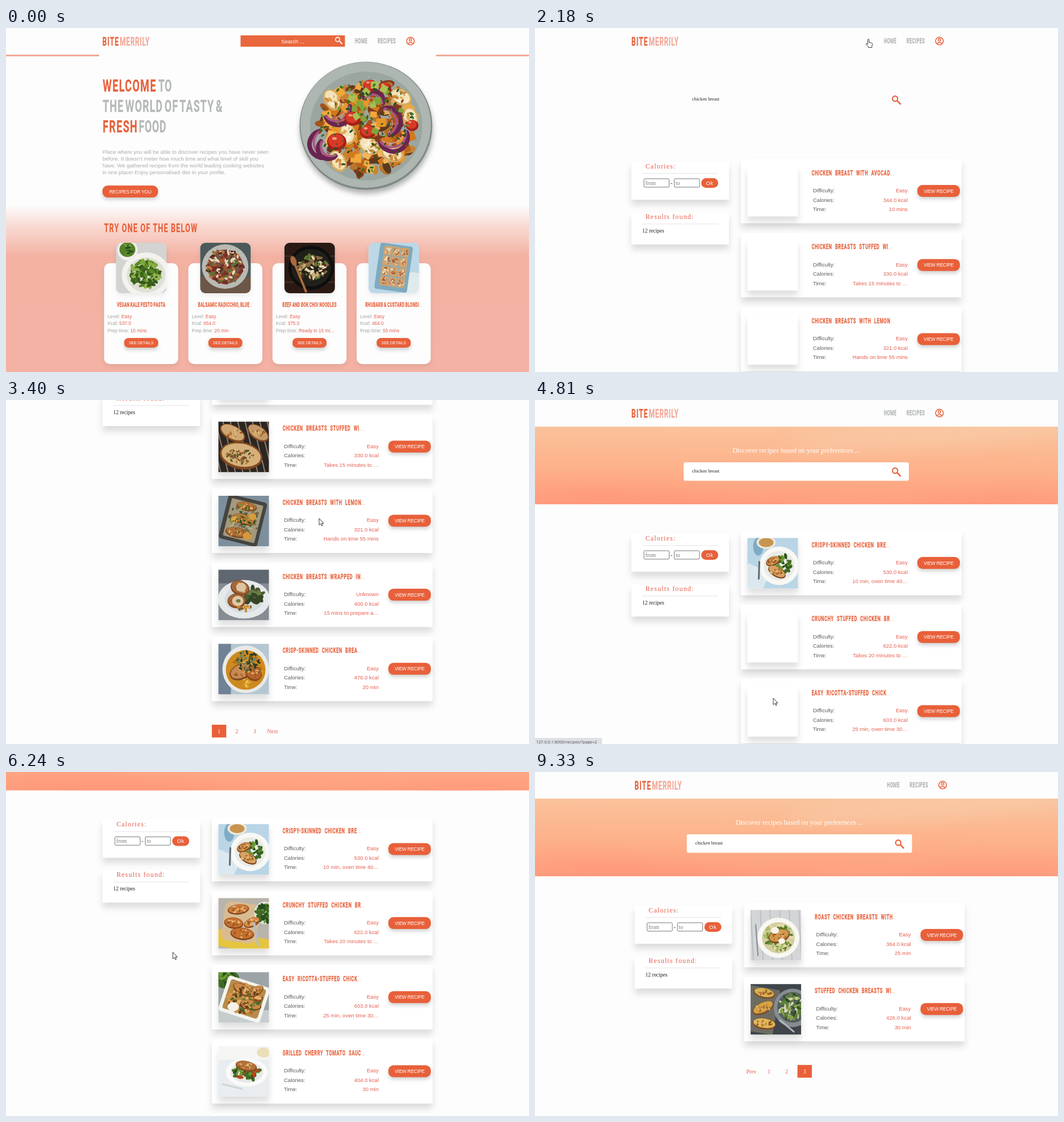
Recreate the animation shown at these times as an HTML page. Size 922 by 607 pixels, loop 9670 ms.

```html
<!DOCTYPE html>
<html lang="en">
<head>
<meta charset="utf-8">
<title>Recipe finder</title>
<style>
html, body { margin: 0; width: 100%; height: 100%; overflow: hidden; background: #fdfdfd; }
svg { display: block; width: 922px; height: 607px; }
text { white-space: pre; }
.s { font-family: "Liberation Sans", Arial, sans-serif; }
.f { font-family: "Liberation Serif", "Times New Roman", serif; }
.u { font-family: "Open Sans", sans-serif; }
.d { font-family: Roboto, sans-serif; font-weight: 700; stroke-width: .25; }
.card { filter: drop-shadow(0 9px 6px rgba(0,0,0,.13)); }
.tile { filter: drop-shadow(0 4px 4px rgba(0,0,0,.07)); }
.pill { filter: drop-shadow(0 4px 3px rgba(0,0,0,.18)); }
.plate { filter: drop-shadow(1px 7px 5px rgba(0,0,0,.3)); }
.soft { filter: blur(14px); }
.food { filter: blur(.6px); }
</style>
</head>
<body>
<svg id="stage" viewBox="0 0 922 607"></svg>
<script>
const LOOP = 9670, TICK = 70;
const ORANGE = '#e8603a', SALMON = '#f3a899', GREY = '#b4b8b7', RED = '#e45f50', PAPER = '#fdfdfd';

// Drawing helpers
const E = (x, y, rx, ry, fill, a = 0) =>
  `<ellipse cx="${x}" cy="${y}" rx="${rx}" ry="${ry}" fill="${fill}" transform="rotate(${a} ${x} ${y})"/>`;
const R = (x, y, w, h, fill, r = 0, more = '') =>
  `<rect x="${x}" y="${y}" width="${w}" height="${h}" rx="${r}" fill="${fill}" ${more}/>`;
const tilt = (a, x, y) => `transform="rotate(${a} ${x} ${y})"`;
const P = (d, stroke, w = 1, fill = 'none') =>
  `<path d="${d}" stroke="${stroke}" stroke-width="${w}" fill="${fill}" stroke-linecap="round"/>`;
const T = (x, y, s, size, fill, cls = 's', anchor = 'start', ls = 0) =>
  `<text class="${cls}" x="${x}" y="${y}" font-size="${size}" fill="${fill}" text-anchor="${anchor}" letter-spacing="${ls}">${s}</text>`;
const CONDENSE = .6;
const D = (x, y, s, size, fill, ls = 0, anchor = 'start', ws = 0) =>
  `<text class="d" transform="translate(${x} ${y}) scale(${CONDENSE} 1)" font-size="${size}" fill="${fill}" stroke="${fill}"
    text-anchor="${anchor}" letter-spacing="${ls / CONDENSE}" word-spacing="${ws / CONDENSE}">${
    s.replace('…', '<tspan font-weight="300" stroke="none">...</tspan>')}</text>`;
const G = (s, attrs = '') => `<g ${attrs}>${s}</g>`;
const pill = (x, y, w, h, s, size, ls) =>
  R(x, y, w, h, ORANGE, h * .43, 'class="pill"') + T(x + w / 2, y + h / 2 + size * .36, s, size, '#fff', 's', 'middle', ls);
const lens = (x, y, k, c) =>
  G(`<circle cx="5.5" cy="5.5" r="4.4" fill="none" stroke="${c}" stroke-width="2"/>` + P('M9 9L14.4 14.4', c, 2.4),
    `transform="translate(${x} ${y}) scale(${k})"`);

// Scatters small blobs or blocks inside an ellipse
function bits(seed, n, x, y, rx, ry, size, colors, block = false) {
  const rnd = () => (seed = seed * 16807 % 2147483647) / 2147483647;
  let out = '';
  seed = seed * 7919 + 13;
  rnd();
  for (let i = 0; i < n; i++) {
    const a = rnd() * 6.283, r = Math.sqrt(rnd()), s = size * (.6 + .7 * rnd());
    const px = +(x + rx * r * Math.cos(a)).toFixed(1), py = +(y + ry * r * Math.sin(a)).toFixed(1);
    const turn = Math.round(rnd() * 180), c = colors[Math.floor(rnd() * colors.length)];
    out += block ? R(px - s, py - s, s * 2, s * 1.8, c, 1, tilt(turn, px, py)) : E(px, py, s, s * .5, c, turn);
  }
  return out;
}

const GREENS = ['#3f6b25', '#6d9a35', '#274d1e'];
const GOLDS = ['#b8692c', '#d9974a', '#8f4a1e', '#e3b268'];
const bg = c => R(-4, -4, 97, 97, c);
const dish = (x, y, r, rim, well) => E(x, y, r, r * .96, rim) + E(x, y, r * .78, r * .74, well);
const fillet = (x, y, rx, ry, a, c = '#c98a47') => E(x, y, rx, ry, '#7f4821', a) + E(x, y - 1, rx * .92, ry * .84, c, a) +
  bits(x + y, 16, x, y, rx * .7, ry * .65, 2.6, ['#96541f', '#e4b877', '#b2702f']);

// 89 x 89 food pictures
const pics = {
  pesto: bg('#d3d4d1') + E(53, 57, 43, 40, '#f3f2ee') + E(53, 57, 34, 31, '#dfe0d6') +
    bits(3, 150, 51, 54, 26, 23, 5, ['#5d8a26', '#7fa83c', '#3f6a1b', '#90b34e', '#345a1a']) +
    E(20, 13, 18, 18, '#efefea') + E(20, 12, 14, 13, '#557f2a') + bits(4, 18, 20, 12, 10, 9, 3, GREENS),
  balsamic: bg('#4c5a59') + R(0, 60, 89, 33, '#6b5647') + dish(44, 42, 41, '#b9bab3', '#77513f') +
    bits(5, 150, 44, 42, 32, 30, 4, ['#7b2e25', '#a6552c', '#54281f', '#e5d9c5', '#bf7740', '#607035']),
  noodles: bg('#2b1a14') + R(0, 22, 89, 3, '#402a20') + R(0, 68, 89, 3, '#402a20') + E(47, 44, 40, 39, '#0e0e0f') +
    E(47, 44, 35, 33, '#211f1a') + bits(6, 100, 50, 43, 26, 21, 4, ['#c8ab77', '#8c6a3e', '#5e7a35', '#e5d8b2', '#4a2c1c']) +
    P('M17 34L38 86', '#a86b3c', 4) + E(16, 32, 5, 9, '#a86b3c', -20),
  blondie: bg('#bcd8e6') + E(78, 76, 24, 24, '#dfeaec') + G(R(15, 3, 58, 82, '#7fa9be', 4) +
    Array.from({ length: 12 }, (_, i) => {
      const x = 23 + i % 3 * 15, y = 7 + Math.floor(i / 3) * 18;
      return R(x, y, 14, 16.5, '#cfa46f', 1) + bits(i + 8, 9, x + 7, y + 8, 5, 6, 2.3, ['#9c5a36', '#f0dfbb', '#c4714e']);
    }).join(''), tilt(8, 45, 45)),
  avocado: bg('#dfe2df') + dish(45, 46, 40, '#f6f5f0', '#e9e6da') + bits(21, 50, 45, 44, 27, 24, 5, ['#86a845', '#b9c968', '#d2603a', '#4d7530']) +
    fillet(44, 48, 22, 11, -20),
  grill: bg('#2d2520') + Array.from({ length: 9 }, (_, i) => P(`M${i * 13 - 18} 0L${i * 13 + 4} 89`, '#8b8177', 2)).join('') +
    fillet(25, 20, 24, 13, 28, '#cfa673') + fillet(70, 20, 21, 12, 35, '#c39a69') + fillet(40, 60, 38, 24, 10, '#d6b07a') +
    bits(23, 44, 38, 60, 24, 13, 3, ['#6a3d1c', '#9a6633', '#4f5a2a']),
  lemon: bg('#7d8f9c') + R(8, 4, 70, 80, '#45443f', 5, tilt(14, 44, 44)) + R(15, 10, 57, 68, '#a3987d', 2, tilt(14, 44, 44)) +
    bits(24, 40, 44, 44, 27, 32, 5, ['#8a7d62', '#b5a988', '#71654c']) +
    fillet(50, 19, 18, 8, 12, '#ae7338') + fillet(45, 42, 21, 9, 18, '#b87d3d') + fillet(32, 65, 20, 9, 12, '#ae7338') +
    E(60, 37, 7, 6, '#d99c3b') + E(28, 42, 6, 6, '#dca548') + E(51, 71, 8, 7, '#d5983c') + bits(25, 34, 43, 43, 26, 30, 2.5, GREENS),
  wrapped: bg('#868c93') + R(-4, -4, 97, 28, '#5f6770') + E(45, 52, 46, 34, '#e6e9ea') + E(45, 52, 34, 24, '#d6dbdd') +
    bits(27, 30, 63, 46, 16, 13, 8, ['#4a5a33', '#6c7a45', '#354627']) + fillet(38, 32, 17, 13, 20, '#a7683b') + E(40, 31, 9, 8, '#dcc4a2') +
    fillet(32, 55, 16, 13, 0, '#a7683b') + E(34, 55, 10, 9, '#dfc9aa') + E(35, 55, 4, 3, '#6d7a3c') +
    bits(28, 16, 46, 68, 14, 5, 3, ['#c98a2b', '#7d5a2c']),
  broth: bg('#b5c6d3') + R(-4, -4, 26, 97, '#6f8296') + E(48, 45, 41, 42, '#e9e9e5') + E(48, 46, 35, 35, '#cd8a20') +
    bits(29, 34, 48, 48, 30, 28, 4, ['#e3a530', '#ba7015', '#f0c35b']) + fillet(40, 49, 21, 14, -25, '#c98a52') + fillet(62, 52, 15, 13, 30, '#b9632a') +
    bits(30, 60, 52, 30, 20, 18, 3, ['#47512d', '#2e3923', '#7c8250']),
  blue: bg('#b9d5e6') + R(-8, 50, 42, 44, '#dce8ef', 0, tilt(24, 10, 70)) + E(19, 15, 9, 16, '#7eacc5') + E(33, 8, 17, 11, '#efe9da') + E(33, 8, 13, 8, '#c89550') +
    E(56, 49, 35, 34, '#f8f8f4') + E(56, 49, 27, 26, '#e8ebe7') + bits(31, 50, 65, 45, 14, 15, 4, GREENS) +
    fillet(45, 41, 13, 8, -25) + fillet(52, 60, 17, 9, 30, '#d8a362') + P('M21 42L20 72', '#5f6870', 3),
  board: bg('#b9b4ab') + R(-4, 64, 97, 29, '#e5c53f', 0, tilt(12, 44, 76)) + R(8, 8, 62, 70, '#d9bb92', 12, tilt(8, 40, 44)) +
    E(82, 26, 19, 20, '#dfe2dd') + bits(33, 44, 82, 26, 14, 15, 6, GREENS) + fillet(35, 20, 19, 9, -6, '#cd7835') +
    fillet(27, 44, 17, 10, 8, '#c96f2d') + fillet(59, 43, 15, 8, -24, '#d88943') + fillet(42, 63, 21, 11, 6, '#c96f2d') + P('M63 44L70 83', '#b8bdc0', 4),
  tray: bg('#9ca4a7') + R(-4, 67, 97, 26, '#c6cdce') + E(14, 12, 23, 17, '#436e29') + bits(35, 36, 14, 12, 20, 14, 5, GREENS) +
    R(7, 15, 77, 65, '#f4f4ef', 5, tilt(18, 45, 47)) + R(13, 20, 65, 54, '#b78b48', 4, tilt(18, 45, 47)) +
    bits(36, 110, 46, 47, 30, 25, 5, [...GOLDS, '#56702c', '#63401e']) + fillet(43, 31, 19, 9, 30) + fillet(65, 34, 16, 8, -30) + fillet(57, 58, 19, 9, 12) +
    bits(37, 40, 48, 48, 28, 22, 3, ['#4c682a', '#5b3519', '#d6a654']) + E(26, 61, 10, 8, '#f3f1e8'),
  tomato: bg('#e9edef') + R(-4, -4, 97, 28, '#f5f5f4') + E(80, 11, 12, 9, '#eadfb9') + E(50, 46, 37, 25, '#fafafa') + E(50, 46, 29, 18, '#e7e8e5') +
    bits(38, 60, 49, 46, 24, 12, 5, [...GREENS, '#b9451f']) + fillet(49, 35, 19, 9, 12, '#b5713a') + P('M8 67L41 75', '#cfd5d7', 3),
  poached: bg('#8c9eb5') + R(-4, -4, 34, 97, '#6c7f98', 0, tilt(8, 0, 0)) + dish(47, 46, 40, '#ece5da', '#dcd2c3') +
    bits(40, 60, 47, 47, 26, 23, 5, ['#d87a2c', '#e3a04a', '#557232', '#bf5a24']) + E(49, 45, 12, 21, '#f5efe1', 8) +
    E(48, 38, 8, 11, '#fdf9ef', 8) + bits(41, 7, 48, 42, 6, 14, 1.5, GREENS) + P('M7 19L4 58', '#3d4653', 3),
  roast: bg('#d3d5d6') + Array.from({ length: 6 }, (_, i) => P(`M${i * 17} 0L${i * 17 + 5} 89`, '#b4babe', 1.5)).join('') +
    dish(49, 49, 37, '#f8f7f2', '#d4cda0') + bits(43, 90, 49, 49, 26, 24, 4, ['#7d9b3c', '#a9bc68', '#e6d9a7', '#557b2b']) +
    fillet(50, 46, 19, 12, -18, '#d09a4d') + E(43, 36, 7, 6, '#faf5e9') + E(55, 55, 6, 5, '#faf5e9') + P('M9 26L13 80', '#81898d', 2),
  slate: bg('#3f454b') + R(-8, 6, 54, 80, '#6c6c63', 3, tilt(10, 20, 45)) + fillet(24, 16, 19, 9, 12, '#d5b150') + fillet(22, 42, 20, 10, -26, '#d2a346') +
    fillet(24, 70, 21, 10, 8, '#dcb75b') + E(74, 42, 33, 34, '#868d92') + E(74, 41, 27, 27, '#555d61') +
    bits(45, 90, 72, 39, 21, 22, 4, ['#5d8138', '#86a34d', '#324e22', '#d8d5b2']) + P('M52 64L76 84', '#b4b8b8', 3),
};
const photo = (name, x, y, clip, attrs = '') =>
  G(G(G(pics[name], 'class="food"'), `clip-path="url(#${clip})"`), `transform="translate(${x} ${y})" ${attrs}`);

const header = () =>
  D(170, 31, 'BITE', 20, ORANGE, 1.1) + D(200.5, 31, 'MERRILY', 20, SALMON, .7) +
  D(615, 27, 'HOME', 12.2, '#aeb4b2', .4) + D(655, 27, 'RECIPES', 12.2, '#aeb4b2', .5) +
  `<circle cx="713" cy="23" r="6.8" fill="none" stroke="${ORANGE}" stroke-width="1.6"/>
   <circle cx="713" cy="20.9" r="2.2" fill="none" stroke="${ORANGE}" stroke-width="1.4"/>` + P('M708.5 27.5Q713 23.6 717.5 27.5', ORANGE, 1.4);

function salad() {
  const onion = (x, y, r, a) => G(P(`M${-r} 0A${r} ${r} 0 0 1 ${r} 0`, '#6a2450', 8) +
    P(`M${-r + 1} 1A${r} ${r} 0 0 1 ${r - 1} 1`, '#a8577f', 4) + P(`M${-r + 4} 2A${r} ${r} 0 0 1 ${r - 4} 2`, '#d9a5bd', 1.2),
    `transform="translate(${x} ${y}) rotate(${a})"`);
  const cheese = (x, y, a) => E(x, y, 20, 14, '#d5ac62', a) + E(x, y - 1, 17, 11, '#f3e2b8', a) +
    bits(x, 10, x, y, 14, 11, 4, ['#c6873b', '#dca85a', '#f9f0d8']);
  const tomato = (x, y, r) => E(x, y, r, r * .9, '#a91d18') + E(x - 1, y - 2, r * .82, r * .7, '#d63a27') + E(x - 4, y - 6, r * .25, r * .15, '#f39a80');
  const food = bits(52, 150, 638, 174, 84, 84, 11, ['#a6521c', '#7d3a1c', '#b8752b', '#c98334', '#5c3a1c']) +
    bits(53, 70, 638, 174, 82, 80, 7.5, ['#e8962a', '#f0a83c', '#d27a1e', '#f3b658', '#b9651b'], true) +
    cheese(575, 127, 60) + cheese(696, 122, 25) + cheese(713, 160, 80) + cheese(585, 235, 60) + cheese(681, 222, 20) + cheese(602, 186, 80) + cheese(640, 208, 30) +
    onion(585, 148, 23, 155) + onion(559, 205, 24, 250) + onion(568, 213, 18, 225) + onion(672, 165, 24, 80) + onion(683, 193, 25, 160) + onion(648, 128, 17, 15) +
    tomato(583, 201, 17) + tomato(611, 160, 14) + tomato(638, 183, 14) + tomato(642, 102, 12) + tomato(668, 106, 11) + tomato(716, 172, 11) +
    bits(54, 14, 640, 174, 80, 78, 5.5, ['#7fa63a', '#a8c054'], true) +
    bits(55, 150, 637, 172, 84, 82, 3, [...GREENS, '#355f20', '#8a3a1c']);
  return G(E(634.5, 172.5, 117, 113, '#7f8987') + E(634, 171, 115, 111, '#adb6b1') + E(635, 173, 99, 96, '#9ba6a1'), 'class="plate"') +
    bits(51, 120, 634, 172, 110, 106, 1, ['#8d9793', '#c1c8c4']) + G(food, 'class="food"');
}

function home() {
  const dishes = [
    ['pesto', 'VEGAN KALE PESTO PASTA', '537.0', '10 mins'],
    ['balsamic', 'BALSAMIC RADICCHIO, BLUE…', '654.0', '20 min'],
    ['noodles', 'BEEF AND BOK CHOI NOODLES', '375.0', 'Ready in 15 mi…'],
    ['blondie', 'RHUBARB &amp; CUSTARD BLONDI…', '464.0', '55 mins'],
  ];
  const intro = ['Place where you will be able to discover recipes you have never seen',
    'before. It doesn\'t meter how much time and what level of skill you',
    'have. We gathered recipes from the world leading cooking websites',
    'in one place! Enjoy personalised diet in your profile.'];
  const pair = (x, y, k, v) => T(x, y, `${k}: <tspan fill="${RED}">${v}</tspan>`, 8.3, '#a3a6a6');
  return R(0, 0, 922, 607, PAPER) + R(0, 312, 922, 295, 'url(#dusk)') +
    R(0, 47, 164, 3, SALMON) + R(758, 47, 164, 3, SALMON) + header() +
    R(413.5, 13, 184, 20, '#e9673c') + T(505.5, 26.5, 'Search ...', 9.5, '#fff', 's', 'middle').replace('<text', '<text id="query"') +
    lens(580, 15.5, .85, '#fff') +
    D(170.5, 112, 'WELCOME', 30, ORANGE, 1.4) + D(268.5, 112, 'TO', 30, GREY, .4) +
    D(170.5, 148, 'THE WORLD OF TASTY &amp;', 30, GREY, 1.1, 'start', -3) +
    D(170.5, 184, 'FRESH', 30, ORANGE, 1.4) + D(234, 184, 'FOOD', 30, GREY, .6) +
    intro.map((s, i) => T(170, 222.3 + i * 12, s, 9.52, '#a9adac')).join('') +
    pill(170, 278, 98, 21, 'RECIPES FOR YOU', 8.4, -.2) + salad() +
    D(173, 360, 'TRY ONE OF THE BELOW', 21, ORANGE, 1.22) +
    dishes.map(([pic, name, kcal, time], i) => {
      const x = 173 + i * 148.4;
      return R(x, 415, 130.5, 178, PAPER, 10, 'class="tile"') + R(x + 21, 379, 89, 89, '#fff', 9, 'class="tile"') +
        photo(pic, x + 21, 379, 'round') + D(x + 65.3, 492.3, name, 10.6, ORANGE, .3, 'middle', -.4) +
        pair(x + 6, 512, 'Level', 'Easy') + pair(x + 6, 524, 'Kcal', kcal) + pair(x + 6, 536.5, 'Prep time', time) +
        pill(x + 35.3, 547, 60, 17, 'SEE DETAILS', 7.1, -.17);
    }).join('');
}

const results = [
  [['avocado', 'CHICKEN BREAST WITH AVOCAD…', '344.0', '10 mins'],
    ['grill', 'CHICKEN BREASTS STUFFED WI…', '330.0', 'Takes 15 minutes to …'],
    ['lemon', 'CHICKEN BREASTS WITH LEMON…', '321.0', 'Hands on time 55 mins'],
    ['wrapped', 'CHICKEN BREASTS WRAPPED IN…', '400.0', '15 mins to prepare a…', 'Unknown'],
    ['broth', 'CRISP-SKINNED CHICKEN BREA…', '476.0', '20 min']],
  [['blue', 'CRISPY-SKINNED CHICKEN BRE…', '530.0', '10 min, oven time 40…'],
    ['board', 'CRUNCHY STUFFED CHICKEN BR…', '622.0', 'Takes 20 minutes to …'],
    ['tray', 'EASY RICOTTA-STUFFED CHICK…', '603.0', '25 min, oven time 30…'],
    ['tomato', 'GRILLED CHERRY TOMATO SAUC…', '404.0', '30 min'],
    ['poached', 'POACHED CHICKEN BREAST', '133.0', '15 mins']],
  [['roast', 'ROAST CHICKEN BREASTS WITH…', '364.0', '25 min'],
    ['slate', 'STUFFED CHICKEN BREASTS WI…', '426.0', '30 min']],
];

function recipe([pic, name, kcal, time, level = 'Easy'], i, page) {
  const row = (y, k, v) => T(490, y, k, 9.5, '#5b5b5b') + T(657, y, v, 9.5, RED, 's', 'end');
  return G(R(363, 231, 389, 113.5, '#fff', 0, 'class="card"') + R(374.5, 243.5, 89, 89, '#fff', 0, 'class="card"') +
    photo(pic, 374.5, 243.5, 'square', `class="pic${page}${i ? 'b' : 'a'}"`) + D(487.7, 259.5, name, 12.5, ORANGE, .65, 'start', 2.8) +
    row(290, 'Difficulty:', level) + row(306.5, 'Calories:', `${kcal} kcal`) + row(323, 'Time:', time) +
    pill(674, 277, 75, 21, 'VIEW RECIPE', 8.4, -.2), `transform="translate(0 ${i * 130.7})"`);
}

function listing(list, index) {
  const page = index + 1, y = 231 + list.length * 130.7 + 24.5;
  const links = [...(page > 1 ? ['Prev'] : []), 1, 2, 3, ...(page < 3 ? ['Next'] : [])];
  const field = (x, s) => R(x, 266, 44.5, 14.8, '#fff', 1.5, 'stroke="#777"') + T(x + 2.5, 276.6, s, 9.5, '#777', 'f');
  const side = (top, h, s, base) => R(170, top, 172, h, '#fff', 0, 'class="card"') +
    T(194.7, base, s, 12, RED, 'f', 'start', 1.15) + R(189, base + 8.3, 134, 1, '#e4e4e4');
  const banner = R(0, 47, 922, 137, 'url(#peach)') + G(G(E(700, 62, 260, 22, '#f8cba8', -4) + E(180, 176, 170, 14, '#ff9678', 4) +
    E(560, 180, 130, 9, '#ffa884', -3) + E(800, 182, 120, 12, '#ff987c', -4), 'class="soft"'), 'clip-path="url(#band)" opacity=".6"');
  const inner = header() + G(R(262, 110, 397, 32.5, '#fff', 3) + T(460.5, 92.5, 'Discover recipes based on your preferences ...', 12.2, '#fff', 'f', 'middle'), `class="hero${page}"`) +
    T(277, 128, 'chicken breast', 8.4, '#222', 'f') + lens(629, 119, 1.05, ORANGE) +
    side(236, 67, 'Calories:', 248) + field(192, 'from') + T(239, 276.5, '-', 9.5, '#222', 'f') + field(245.5, 'to') +
    R(293, 265, 30, 17, ORANGE, 8.5) + T(308, 276.8, 'Ok', 9.5, '#fff', 's', 'middle', .4) +
    side(325, 57, 'Results found:', 337) + T(189, 361, '12 recipes', 9.5, '#222', 'f') +
    list.map((r, i) => recipe(r, i, page)).join('') +
    links.map((s, i) => {
      const x = 375.6 + i * 31.4, on = s === page;
      return (on ? R(x - 12.7, y, 25.4, 22.5, ORANGE) : '') + T(x, y + 14.6, s, 9.6, on ? '#fff' : RED, 'f', 'middle');
    }).join('');
  return G(G(banner, `class="hero${page}"`) + G(inner, page === 3 ? 'transform="translate(5.6 0)"' : ''), `id="page${page}"`);
}

const status = page => G(R(-1, 597, 118.5, 11, '#dee1e6', 2, 'stroke="#c4c7cb" stroke-width=".6"') +
  T(2, 606, `127.0.0.1:8000/recipes/?page=${page}`, 7.3, '#4a4d51', 'u'), `id="status${page}"`);

const stage = document.getElementById('stage');
stage.innerHTML = `<defs>
  <linearGradient id="dusk" x2="0" y2="1"><stop stop-color="${PAPER}"/><stop offset=".12" stop-color="#f9dcd5"/>
    <stop offset=".31" stop-color="#f3b1a2"/><stop offset="1" stop-color="#f3b2a4"/></linearGradient>
  <linearGradient id="peach" x1=".53" y1="0" x2=".47" y2="1"><stop stop-color="#fac39c"/><stop offset=".5" stop-color="#fdb38b"/>
    <stop offset="1" stop-color="#ff9d7e"/></linearGradient>
  <clipPath id="round"><rect width="89" height="89" rx="9"/></clipPath>
  <clipPath id="square"><rect width="89" height="89"/></clipPath>
  <clipPath id="band"><rect y="47" width="922" height="137"/></clipPath></defs>` +
  R(0, 0, 922, 607, PAPER) + G(home(), 'id="home"') + results.map(listing).join('') + status(2) + status(3) +
  G(`<path d="M0 0V11.5L2.7 9.2L4.5 13L6.3 12.2L4.6 8.5H8Z" fill="#fff" stroke="#222" stroke-width=".9"/>`, 'id="arrow"') +
  G(P('M3.6 9.5V1.8a1.2 1.2 0 0 1 2.4 0V6.3l4.3.9q1.6.4 1.4 2.2l-.8 4v2H4.7v-1.3L.7 9.9q-.5-1.5.9-1.6z', '#222', .9, '#fff'), 'id="hand"');

// [selector, shown from, hidden from]
const shows = [
  ['#home', 0, 2180], ['#page1', 2180, 4470], ['#page2', 4470, 7800], ['#page3', 7800, LOOP],
  ['.hero1', 2260, LOOP], ['.pic1a', 2260, LOOP], ['.pic1b', 2260, LOOP],
  ['.hero2', 4810, LOOP], ['.pic2a', 4810, LOOP], ['.pic2b', 4880, LOOP],
  ['.hero3', 7950, LOOP], ['.pic3a', 8160, LOOP], ['.pic3b', 8160, LOOP],
  ['#status2', 4130, 4880], ['#status3', 7330, 8210],
].map(([sel, from, to]) => ({ els: [...stage.querySelectorAll(sel)], from, to }));

// [time, offset]
const scrolls = {
  page1: [[3125, 0], [3350, 336], [3440, 336], [3500, 367]],
  page2: [[5660, 0], [5740, 7], [5805, 40], [5870, 73], [5960, 73], [6010, 100], [6150, 100], [6460, 300], [6620, 367]],
};

// [time, x, y, shape]: 0 hidden, 1 arrow, 2 hand
const moves = [
  [0, 900, 595, 0], [70, 898, 590, 1], [255, 731, 74, 0], [620, 590, 178, 1], [830, 538, 16, 1], [1640, 538, 16, 1],
  [1840, 583, 19, 2], [2560, 583, 19, 1], [2770, 552, 209, 1], [3520, 552, 209, 1], [4060, 432, 546, 2],
  [4400, 432, 546, 1], [4470, 420, 526, 1], [4880, 420, 526, 1], [5680, 294, 318, 1], [6700, 294, 318, 1],
  [7090, 464, 555, 2], [7780, 464, 555, 1], [7850, 476, 557, 1], [8390, 476, 557, 1], [8750, 640, 331, 1], [9300, 887, 598, 0],
];

function sample(keys, t) {
  const i = keys.findIndex(k => k[0] > t);
  if (i === 0) return keys[0];
  if (i < 0) return keys[keys.length - 1];
  const a = keys[i - 1], b = keys[i], p = (t - a[0]) / (b[0] - a[0]);
  return a.map((v, n) => n === 3 ? v : v + (b[n] - v) * p);
}

const byId = id => document.getElementById(id);
const [query, arrow, hand, page1, page2] = ['query', 'arrow', 'hand', 'page1', 'page2'].map(byId);
const visible = (el, on) => { el.style.display = on ? '' : 'none'; };

function render(t) {
  const q = Math.floor(t / TICK) * TICK;
  for (const s of shows) s.els.forEach(el => visible(el, t >= s.from && t < s.to));
  page1.setAttribute('transform', `translate(0 ${-sample(scrolls.page1, q)[1]})`);
  page2.setAttribute('transform', `translate(0 ${-sample(scrolls.page2, q)[1]})`);
  const typed = Math.floor((t - 880) / 52) + 1;
  query.textContent = typed > 0 ? 'chicken breast'.slice(0, typed) : 'Search ...';
  const [, x, y, shape] = sample(moves, q);
  visible(arrow, shape === 1);
  visible(hand, shape === 2);
  for (const el of [arrow, hand]) el.setAttribute('transform', `translate(${x} ${y})`);
}

const start = performance.now();
function frame() {
  render((performance.now() - start) % LOOP);
  requestAnimationFrame(frame);
}
frame();
</script>
</body>
</html>
```
